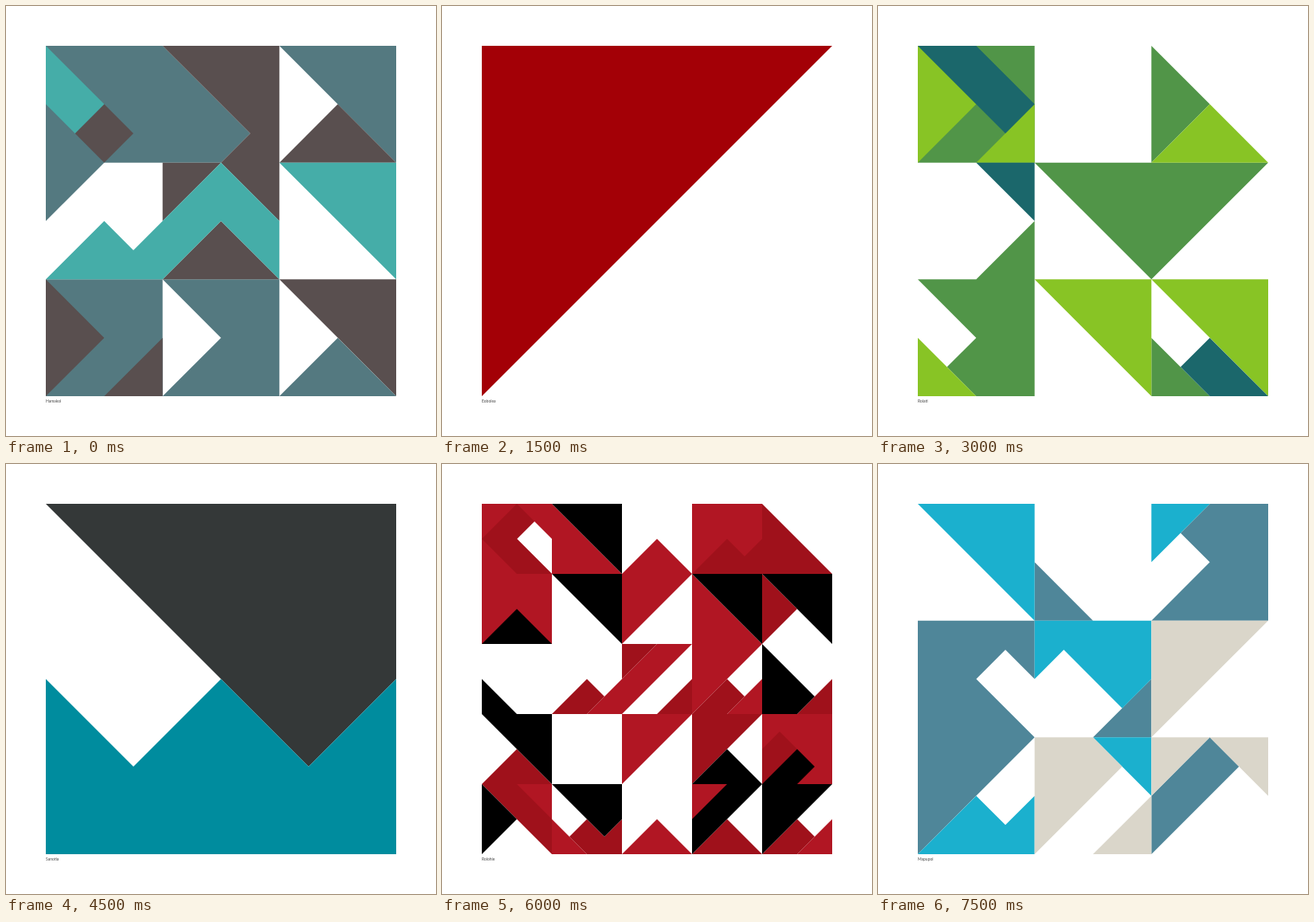
These frames come from a looping animation (540 px wide and 540 px high, 8000 ms). An HTML page:

```html
<!DOCTYPE html>
<html lang="en">
<head>
<meta charset="utf-8">
<title>Triangle tilings</title>
<style>
  html, body { margin: 0; width: 100%; height: 100%; overflow: hidden; background: #fff; }
  #stage { display: block; width: 100%; height: 100%; }
  #stage > g { display: none; }
  #stage > g.on { display: inline; }
  text { font: 5px Lato, sans-serif; fill: #444; }
</style>
</head>
<body>
<!-- Each tiling is drawn in quarter-tile units. -->
<svg id="stage" viewBox="0 0 540 540">
  <g class="on">
    <svg x="50" y="50" width="440" height="440" viewBox="0 0 12 12">
      <g fill="#547980">
        <path d="M0 0 4 0 7 3 6 4 2 4 0 6z M8 0 12 0 12 4z"/>
        <path d="M0 8 4 8 4 12 0 12z M4 8 8 8 8 12 4 12 6 10z"/>
      </g>
      <g fill="#594f4f">
        <path d="M4 0 8 0 8 6 6 4 7 3z M2 2 3 3 2 4 1 3z M10 2 12 4 8 4z"/>
        <path d="M4 4 6 4 4 6z M6 6 8 8 4 8z"/>
        <path d="M0 8 2 10 0 12z M4 10 4 12 2 12z M8 8 12 8 12 12z"/>
      </g>
      <path fill="#45ada8" d="M0 0 2 2 1 3 0 2z M6 4 8 6 8 8 6 6 4 8 0 8 2 6 3 7z M8 4 12 4 12 8z"/>
      <path fill="#547980" d="M10 10 12 12 8 12z"/>
    </svg>
    <text x="50" y="497.5">Hamakoi</text>
  </g>

  <g>
    <svg x="50" y="50" width="440" height="440" viewBox="0 0 4 4">
      <path fill="#a30006" d="M0 0 4 0 0 4z"/>
    </svg>
    <text x="50" y="497.5">Eobolea</text>
  </g>

  <g>
    <svg x="50" y="50" width="440" height="440" viewBox="0 0 12 12">
      <g fill="#519548">
        <path d="M0 0 4 0 4 4 0 4z M8 0 10 2 8 4z M4 4 12 4 8 8z"/>
        <path d="M4 6 4 12 2 12 1 11 2 10 0 8 2 8z M8 10 10 12 8 12z"/>
      </g>
      <g fill="#88c425">
        <path d="M0 0 2 2 0 4z M4 2 4 4 2 4z M10 2 12 4 8 4z"/>
        <path d="M0 10 2 12 0 12z M4 8 8 8 8 12z M8 8 12 8 12 12z"/>
      </g>
      <path fill="#1b676b" d="M0 0 2 0 4 2 3 3z M2 4 4 4 4 6z M10 10 12 12 10 12 9 11z"/>
    </svg>
    <text x="50" y="497.5">Rolati</text>
  </g>

  <g>
    <svg x="50" y="50" width="440" height="440" viewBox="0 0 4 4">
      <path fill="#343838" d="M0 0 4 0 4 2 3 3z"/>
      <path fill="#008c9e" d="M0 2 1 3 2 2 3 3 4 2 4 4 0 4z"/>
    </svg>
    <text x="50" y="497.5">Sanotia</text>
  </g>

  <g>
    <svg x="50" y="50" width="440" height="440" viewBox="0 0 20 20">
      <g fill="#b11623">
        <path d="M0 0 4 0 4 2 3 1 2 2 4 4 4 8 0 8z M4 0 8 4 4 4z M12 0 16 0 16 4 12 4z"/>
        <path d="M10 2 12 4 8 8 8 4z M12 4 16 8 12 12z"/>
        <path d="M10 8 12 8 8 12 6 12 8 10z M16 10 16 12 14 12z"/>
        <path d="M8 12 12 12 8 16z M16 12 20 12 20 16 16 16z"/>
        <path d="M4 18 6 20 4 20z M10 18 12 20 8 20z M20 18 20 20 18 20z"/>
      </g>
      <g fill="#9f111b">
        <path d="M2 0 0 2 2 4 4 4 2 2 3 1z M12 4 14 2 15 3 16 2 16 0 20 4z"/>
        <path d="M16 4 18 6 16 8z M8 8 10 8 8 10z"/>
        <path d="M4 12 6 10 7 11 6 12z M12 10 12 12 10 12z M12 12 14 10 15 11 14 12z M20 10 20 12 18 12z"/>
        <path d="M12 12 16 12 12 16z M16 14 17 13 18 14 16 16z M2 14 0 16 4 20 4 16z"/>
        <path d="M6 18 7 19 8 18 8 20 6 20 5 19z M14 18 16 20 12 20z M16 20 18 18 19 19 18 20z"/>
      </g>
      <g fill="#000">
        <path d="M4 0 8 0 8 4z M2 6 4 8 0 8z M4 4 8 4 8 8z M12 4 16 4 16 8z M16 4 20 4 20 8z"/>
        <path d="M0 10 2 12 4 12 4 16 0 12z M16 8 19 11 18 12 16 12z"/>
        <path d="M12 16 14 14 16 16 12 20z M18 14 19 15 18 16 16 16z"/>
        <path d="M0 16 2 18 0 20z M4 16 8 16 8 18 7 19z M16 16 20 16 16 20z"/>
      </g>
      <path fill="#b11623" d="M2 16 4 16 4 18z M12 16 14 16 12 18z"/>
    </svg>
    <text x="50" y="497.5">Rolohie</text>
  </g>

  <g>
    <svg x="50" y="50" width="440" height="440" viewBox="0 0 12 12">
      <g fill="#4f8699">
        <path d="M4 2 6 4 4 4z M10 0 12 0 12 4 8 4 10 2 9 1z"/>
        <path d="M0 4 4 4 4 6 3 5 2 6 4 8 0 12z M8 6 8 8 6 8z M10 8 11 9 8 12 8 10z"/>
      </g>
      <g fill="#1bb0ce">
        <path d="M0 0 4 0 4 4z M8 0 10 0 8 2z M4 4 8 4 8 6 7 7 5 5 4 6z"/>
        <path d="M2 10 3 11 4 10 4 12 0 12z M6 8 8 8 8 10z"/>
      </g>
      <g fill="#dad6ca">
        <path d="M8 4 12 4 8 8z M4 8 6 8 7 9 4 12z M8 10 8 12 6 12z"/>
        <path d="M8 8 10 8 8 10z M10 8 12 8 12 10z"/>
      </g>
    </svg>
    <text x="50" y="497.5">Mapupoi</text>
  </g>
</svg>
<script>
  const LOOP = 8000, HOLD = 1500;
  const scenes = document.querySelectorAll('#stage > g');

  function draw() {
    const current = Math.floor(performance.now() % LOOP / HOLD);
    scenes.forEach((scene, i) => scene.classList.toggle('on', i === current));
    requestAnimationFrame(draw);
  }
  draw();
</script>
</body>
</html>
```
